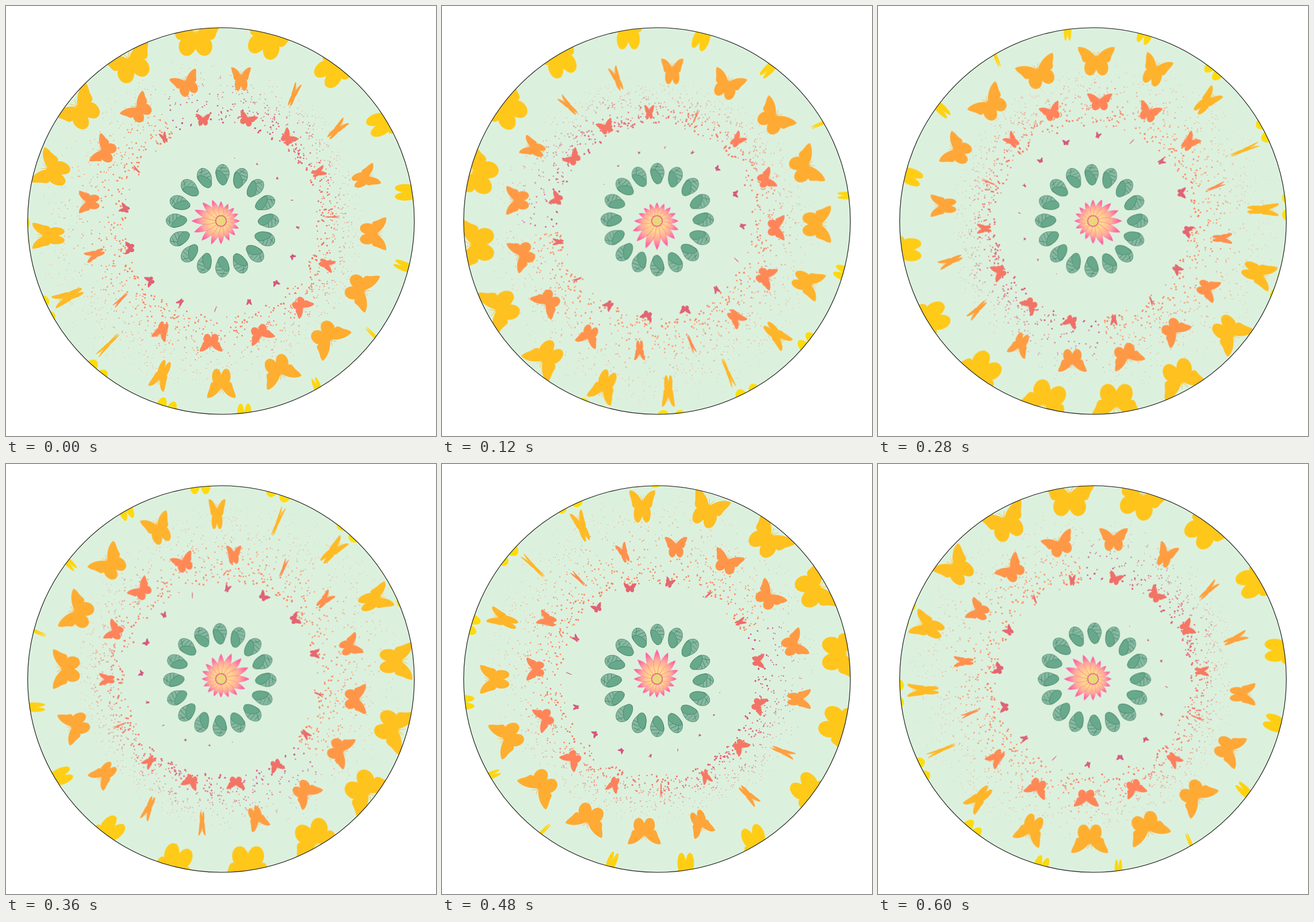
Recreate the animation shown at these times as an HTML page. Size 748x748 px, loop 0.64 s.

```html
<!DOCTYPE html>
<html lang="en">
<head>
<meta charset="utf-8">
<title>Butterfly disc</title>
<style>
  html, body { margin: 0; width: 100%; height: 100%; overflow: hidden; background: #fff; }
  svg { display: block; width: 100vw; height: 100vh; }
  #disc { transform-origin: 0 0; animation: spin 640ms steps(16) infinite; }
  @keyframes spin { to { transform: rotate(-360deg); } }
  .leaf path { stroke: #3d7865; stroke-width: .7; fill: none; }
  .leaf .back { fill: #86b9a0; }
  .leaf .front { fill: #68a98b; }
  .petal { fill: url(#blush); stroke: #ff62a6; stroke-width: .6; }
</style>
</head>
<body>
<svg viewBox="0 0 748 748">
  <defs>
    <clipPath id="rim"><circle r="336.3"/></clipPath>
    <linearGradient id="blush" x1="0" y1="1" x2="0" y2="0">
      <stop offset="0" stop-color="#f2e476"/>
      <stop offset=".35" stop-color="#ffd68c"/>
      <stop offset=".65" stop-color="#ffaa98"/>
      <stop offset=".9" stop-color="#ff62a6"/>
    </linearGradient>
  </defs>
  <g transform="translate(374 374)">
    <circle r="336.3" fill="#dcf1dd"/>
    <g clip-path="url(#rim)">
      <g id="disc">
        <g id="dots"></g>
        <g id="butterflies"></g>
        <g id="leaves" transform="translate(2.5 -.5)"></g>
        <g id="flower"></g>
      </g>
    </g>
    <circle r="336.3" fill="none" stroke="#111" stroke-width="1.1"/>
  </g>
</svg>
<script>
const SLOTS = 16, STEP = 360 / SLOTS, TAU = Math.PI * 2;

function add(parent, tag, attrs) {
  const node = document.createElementNS('http://www.w3.org/2000/svg', tag);
  for (const key in attrs) node.setAttribute(key, attrs[key]);
  return parent.appendChild(node);
}

const layer = id => document.getElementById(id);
const mix = (a, b, t) => a + (b - a) * t;

// Blend along evenly spaced colours, t from 0 to 1
function blend(colours, t) {
  const x = t * (colours.length - 1);
  const k = Math.min(Math.floor(x), colours.length - 2);
  return `rgb(${colours[k].map((v, j) => Math.round(mix(v, colours[k + 1][j], x - k)))})`;
}

const MAGENTA = [196, 66, 140], CORAL = [255, 130, 92], ORANGE = [255, 184, 38], YELLOW = [255, 232, 0];

let seed = 20;
function random() {
  seed = (seed * 1664525 + 1013904223) % 4294967296;
  return seed / 4294967296;
}

// Pollen: one turn of drifting dots, starting at a seam
const SEAM = -29;

function drawDots() {
  for (let n = 0; n < 1800; n++) {
    const turn = random() ** .85;
    const out = random() ** 1.1;
    const reach = 286 - 38 * Math.sin(TAU * (turn - .05));
    const r = mix(164 + 14 * random(), reach, out);
    const a = (SEAM + turn * 360) * Math.PI / 180;
    add(layer('dots'), 'circle', {
      cx: (r * Math.sin(a)).toFixed(1),
      cy: (-r * Math.cos(a)).toFixed(1),
      r: (mix(1.8, .9, out) * mix(.55, 1, random())).toFixed(2),
      fill: blend([MAGENTA, [246, 112, 102], CORAL, CORAL], turn),
      opacity: mix(1, .2, out ** 1.3).toFixed(2)
    });
  }
}

// Butterflies: each slot shows the next moment of one flight outwards
const FLIGHT = 62;
const HALF = 'M0-.2C.3-.62 .95-.98 1.42-.9C1.42-.6 1.2-.45 1.12-.16C1.06 .08 .95 .14 .8 .12C1.03 .4 .92 .98 .5 1C.3 1.02 .14 .88 0 .62Z';
const FEELER = 'M0-.2Q.06-.45 .2-.62';

// Wing beats slow down along the flight
function openness(i) {
  const beat = .225 * i - .0015 * i * i - .72;
  return Math.hypot(.09, Math.sin(Math.PI * beat));
}

function drawButterflies() {
  for (let i = 0; i <= FLIGHT; i++) {
    const x = -7 + 43 * Math.cos(TAU * (i - 29.5) / 42);
    const y = 110 + 4.45 * i;
    const size = .8 + .66 * i;
    const fill = blend([MAGENTA, CORAL, ORANGE, YELLOW], i / FLIGHT);
    const g = add(layer('butterflies'), 'g', {
      transform: `rotate(${STEP * (i + 1)}) translate(${x} ${-y}) scale(${size})`, fill
    });
    for (const side of [-1, 1]) {
      const wing = add(g, 'g', { transform: `scale(${side * openness(i)} 1)` });
      add(wing, 'path', { d: HALF });
      add(wing, 'path', { d: FEELER, fill: 'none', stroke: fill, 'stroke-width': .03 });
    }
    add(g, 'ellipse', { cy: .1, rx: .06, ry: .46 });
  }
}

function drawLeaves() {
  const parts = {
    back: 'M0 18C-7 15-11 4-12-4C-11-13-5-18 0-18C6-18 11-12 12-3C12 2 10 7 8 11C6 15 4 17 0 18Z',
    vein: 'M-4-7L2-18M-6-12H6M-1-6H11.5M4 0H11.5',
    front: 'M1 18C-6 17-12 6-11-5C-11-8-8-9-5-7C2-3 8 4 8 11C7 15 5 18 1 18Z'
  };
  for (let n = 0; n < SLOTS; n++) {
    const g = add(layer('leaves'), 'g', {
      class: 'leaf', transform: `rotate(${n * STEP}) translate(0 -80)`
    });
    for (const name in parts) add(g, 'path', { class: name, d: parts[name] });
  }
}

// Petals swell slowly round the turn, then drop back
function drawFlower() {
  const flower = layer('flower');
  for (let n = 0; n < SLOTS; n++) {
    const swell = Math.sin(Math.PI * (n / SLOTS) ** 1.8) ** 2;
    const grow = mix(32, 51, swell) / 50;
    add(flower, 'path', {
      class: 'petal',
      d: 'M0 0C-3-10-7-22-5.5-32C-4.5-41-1.5-47 0-50C1.5-47 4.5-41 5.5-32C7-22 3-10 0 0Z',
      transform: `rotate(${(n + 1) * STEP}) scale(${mix(grow, 1, .25)} ${grow})`
    });
  }
  add(flower, 'circle', { r: 9.3, fill: '#ead878', stroke: '#e9609a', 'stroke-width': 1.8 });
}

drawDots();
drawButterflies();
drawLeaves();
drawFlower();
</script>
</body>
</html>
```
